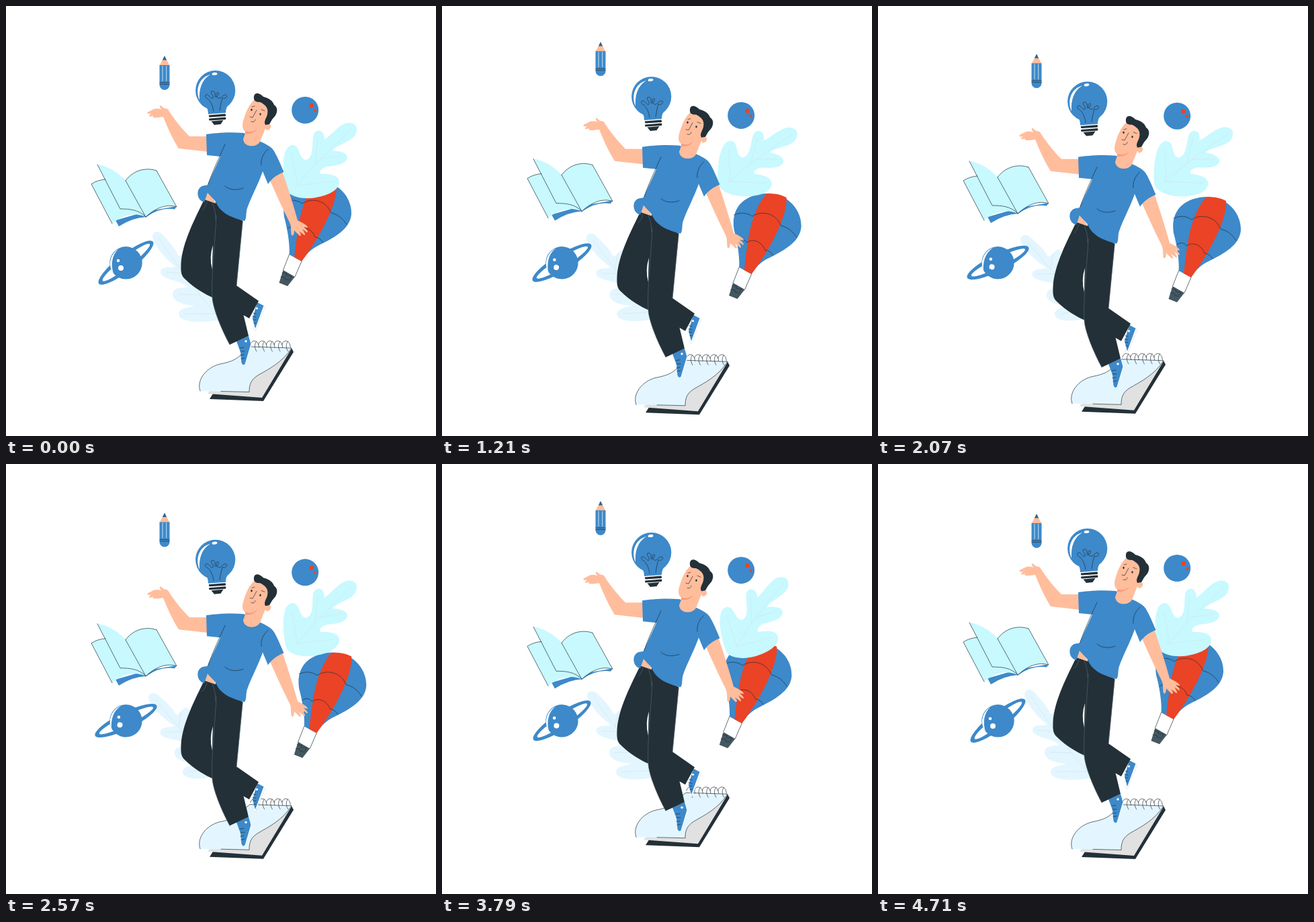
An HTML page that plays this animation: 640x640 px, repeating every 4780 ms.

```html
<!DOCTYPE html>
<html lang="en">
<head>
<meta charset="utf-8">
<title>Juggling ideas</title>
<style>
  html, body { margin: 0; height: 100%; overflow: hidden; background: #fff; }
  svg { display: block; width: 100vw; height: 100vh; }
  .blue { fill: #3d89ca; }
  .dark { fill: #233038; }
  .skin { fill: #ffbd9c; }
  .cyan { fill: #c7f9ff; }
  .pale { fill: #e3f6ff; }
  .red { fill: #ea4326; }
  .white { fill: #fff; }
  .line, .vein, .seam { fill: none; stroke: #233038; stroke-width: .7; stroke-linecap: round; stroke-linejoin: round; }
  .vein { stroke: #d3e6ec; }
  .seam { stroke: #52626b; }
</style>
</head>
<body>
<svg viewBox="0 0 640 640">
  <g id="lowerLeaf">
    <path class="pale" d="M219 347C215 337 226 332 233 340C242 350 250 358 254 367C258 378 262 367 272 362C290 380 298 415 310 430C318 445 322 458 320 467C300 471 258 474 257 458C257 449 275 449 280 446C266 446 247 440 248 428C249 418 264 420 270 418C262 408 229 408 230 395C231 387 244 390 252 388C236 375 224 360 219 347Z"/>
    <path class="vein" d="M228 346C250 380 285 430 318 465M238 396L263 398M256 429L288 430M266 458L311 458M258 390L264 368"/>
  </g>

  <g id="balloon">
    <g transform="translate(-26 -24)">
      <path class="blue" d="M490 284C522 285 541 310 540 334C538 358 510 371 488 382C478 388 470 396 466 404L447.500 394C449 378 444 352 440 338C435 306 454 285 490 284Z"/>
      <path class="red" d="M488 284.500Q505 283 518 290C520 318 492 370 466 404L455 398C460 362 462 316 488 284.500Z"/>
      <path class="line" d="M440 316C450 311 460 313 467 318C480 309 502 312 510 332C520 334 528 341 533 349M445 355C450 351 456 352 459 357C468 350 482 356 486 368Q494 369 498 376M447.500 394L438.500 417M466 404L456 427"/>
      <path fill="#445862" d="M438.500 417L456 427L445 441L432.500 436Z"/>
      <path class="line" d="M437 421l7 1l-1 3l8 1l-2 4M435 427l6 1l1 3l6 1"/>
    </g>
  </g>

  <g id="upperLeaf">
    <path class="cyan" d="M522 184C523 174 511 171 502 176C490 183 482 194 474 199C474 190 470 184 463 186C454 189 458 205 455 218C453 228 446 232 441 226C435 218 436 207 426 207C414 208 412 230 413 245C414 262 416 274 420 278C432 287 450 288 466 284C480 281 496 274 496 262C496 252 484 250 470 250C464 250 468 241 478 239C490 238 506 236 508 226C508 217 494 216 486 215C492 205 522 202 522 184Z"/>
    <path class="vein" d="M432 269C450 245 480 215 515 183M434 267L425 220M460 236L464 197M467 228L500 223M434 267L488 261"/>
  </g>

  <g id="pencil">
    <path class="skin" d="M233 80h6l4.500 8.500h-15Z"/>
    <path class="blue" d="M228.500 88h15v29.500a7.500 7.500 0 0 1-15 0Z"/>
    <path fill="#2d6693" d="M236 74l3.200 6.500h-6.400Z"/>
    <path d="M233 89v23M238.700 89v23" stroke="#c7dff2" fill="none"/>
    <path class="line" d="M229 114h14M229 116.500h14"/>
  </g>

  <g id="bulb">
    <circle class="blue" cx="311.700" cy="125.700" r="29.600"/>
    <path class="blue" d="M295 146Q301 151 301 161L327 159Q327 151 332 146Z"/>
    <path class="dark" d="M302 162.500L326 160.500Q328 162 326.500 164L303 165.500Q301 164 302 162.500ZM302.500 167.500L326.500 165.500Q328.500 167 326.500 169L303 170.500Q301 169 302.500 167.500ZM305.500 171.500L323.500 170L319.500 176L310 177Z"/>
    <path class="white" d="M304 102C288 106 281 124 288 140C287 124 291 110 304 102Z"/>
    <ellipse class="white" cx="310.500" cy="101" rx="4" ry="2" transform="rotate(-8 310.500 101)"/>
    <path class="line" d="M309 157C308 148 304 141 300 138C295 136 296 131 300 132C304 135 306 139 308 137C310 133 303 130 306 127C311 125 312 132 311 135C313 137 318 132 316 129C312 128 312 135 316 137C320 139 322 132 327 132C331 134 327 139 322 137Q319 147 318 156"/>
  </g>

  <g id="moon">
    <circle class="blue" cx="445.200" cy="155" r="20"/>
    <circle class="red" cx="454.600" cy="148" r="3.200"/>
    <circle class="red" cx="460" cy="155.500" r="2"/>
  </g>

  <g id="planet">
    <g transform="rotate(-37.900 178.500 382)">
      <ellipse class="blue" cx="178.500" cy="382" rx="51" ry="12.500"/>
      <ellipse class="white" cx="179" cy="382" rx="44.500" ry="7"/>
    </g>
    <circle class="blue" cx="178.500" cy="382.300" r="24.200"/>
    <path class="white" d="M167 362C155 369 151 386 160 398C156 386 157 371 167 362Z"/>
    <circle class="white" cx="171" cy="390" r="4"/>
    <circle class="white" cx="167" cy="379" r="2.300"/>
  </g>

  <g id="book">
    <path class="blue" d="M163 319L168 328Q188 315 209 314Q230 299 251 302.500L254 298L208 306Z"/>
    <path class="cyan" d="M127 265Q136 259 148 258L208 314C190 306 172 312 158 324Z"/>
    <path class="cyan" d="M178 260C188 246 206 239 224 245L254 299C238 294 222 301 208 314Z"/>
    <path class="cyan" d="M136 236C152 238 170 250 178 260L208 314C198 303 184 302 170 302Z"/>
    <path class="line" d="M208 314C222 301 238 294 254 299L224 245M148 258Q136 259 127 265L158 324M136 236L170 302C184 302 198 303 208 314M178 260L208 314M178 260C188 246 206 239 224 245"/>
  </g>

  <g id="notebook">
    <path class="dark" d="M308 577L303 585L383 588L428 515L425 509Z"/>
    <path fill="#e1e1e1" d="M303 573L300 577L381 583L425 510L364 545Z"/>
    <path class="pale" d="M289 573C283 557 298 538 318 533C338 529 344 526 358 511L363 507L425 509C412 530 390 541 376 549C364 556 362 564 362 574.500Z"/>
    <path class="line" d="M289 573C283 557 298 538 318 533C338 529 344 526 358 511L363 507L425 509C412 530 390 541 376 549C364 556 362 564 362 574.500L320 573.500"/>
    <g id="rings" class="line"></g>
  </g>

  <g id="man">
    <path class="white" d="M383 446L386 448L371 484L368 480Z" stroke="#d5dde1" stroke-width=".6"/>
    <path class="blue" d="M374 441L383.500 446L371 480L367 465Z"/>
    <circle class="white" cx="373.500" cy="450" r="1.600"/>
    <path class="line" d="M368 457l4 1M367 462l5 1M368 467l4 0M369 472l3 0"/>
    <path class="white" d="M362 497L366 504L355 534L352 533Z"/>
    <path class="blue" d="M343 499L361 491L364.500 503L355.500 533Q352.500 536 350.500 531L349 515Z"/>
    <circle class="white" cx="357" cy="499" r="1.700"/>
    <path class="line" d="M348 509l6-1M349 514l6 0M349 520l5-1M350 525l5-1"/>

    <path class="skin" d="M301 277L313 294L293 290Z"/>
    <path class="dark" d="M295 288C283 313 262 352 260.500 384C260 397 261 401 266 406C280 420 298 430 308 434L362 465L376 439L343 416L330 300Z"/>
    <path class="white" d="M308 356Q302 374 307 392Q307 374 308 356Z"/>
    <path class="dark" d="M312 291C325 306 340 313 352.500 320L343 417C350 445 356 470 361 491L333 504C320 480 308 450 307 434C306 410 310 360 312 318Z"/>
    <path class="seam" d="M313 312C311 355 305 405 307 434C308 450 320 480 333 504M352 322L343 417M299 291Q297 300 292 304M307 293Q312 303 312 318"/>

    <path class="skin" d="M301 194L273 194C262 183 250 168 243 157C241 152 238 153 235 152L230 148C227 149 230 153 232 154C228 153 222 152 219 154L211 158C209 161 213 161 216 160L213 163C213 166 217 164 219 163Q217 166 221 166C225 167 230 165 234 165C240 180 248 198 257 212L301 217Z"/>
    <path class="skin" d="M393 260C402 280 411 300 420 318Q424 325 424 330L424.500 340C427 344 429 340 429 334L437 342C441 342 438 338 436 335L444 341C447 341 443 335 441 332L448 337C451 336 446 331 443 329L449 330C450 327 440 322 434 319C429 300 421 275 411 245Z"/>
    <path class="blue" d="M298 191C310 189 332 187 354 189L377 201C386 205 395 209 399 216C405 226 409 237 413.500 247C404 251 396 256 390 265L382 246C377 262 361 292 358 305C357 312 358 316 355 320C340 316 319 310 312 291L300 278L295 292C284 289 283 275 289 270C293 266 298 268 300 266C307 250 314 236 319 224L299 222Z"/>
    <path class="line" d="M326 206C317 226 307 247 301 265M390 213C382 220 379 229 380 237M326 268C334 275 345 274 353 271"/>

    <path class="skin" d="M369 140L391 148L390 176C396 175 396 184 388 185L386 182L378 202C373 211 354 211 353 198L357 187C351 184 351 176 354 168C357 157 362 147 369 140Z"/>
    <path fill="#f79a78" d="M356 186C363 189 369 187 374 183Q369 191 356 190Z"/>
    <path class="dark" d="M369 138C368 129 375 127 383 135C389 137 396 139 399 147C405 151 404 158 401 163L396 169L392 176L386 177C383 171 388 167 389 161C391 153 387 147 378 143Q369 143 369 138Z"/>
    <path class="line" d="M373 155L367 166L363 165M365 172C368 174 371 171 371 169M366 150l4-1M380 154l5 2"/>
    <ellipse class="dark" cx="365.500" cy="154.500" rx="1.200" ry="1.700"/>
    <ellipse class="dark" cx="378.500" cy="161" rx="1.200" ry="1.700"/>
  </g>
</svg>
<script>
const LOOP = 4780, STEPS = 67;
const el = id => document.getElementById(id);
const hump = u => (1 - Math.cos(2 * Math.PI * u)) / 2;

// Sine-eased path through [step, value] keys, at rest at both ends of the loop.
function track(step, ...keys) {
  let [from, a] = [0, 0];
  for (const [to, b] of [...keys, [STEPS, 0]]) {
    if (step <= to) return a + (b - a) * hump((step - from) / (to - from) / 2);
    [from, a] = [to, b];
  }
}

const move = (id, x, y) => el(id).setAttribute('transform', `translate(${x} ${y})`);
const turn = (id, angle, x, y) => el(id).setAttribute('transform', `rotate(${angle} ${x} ${y})`);

let rings = '';
for (let x = 364; x < 420; x += 11.7)
  rings += `<path d="M${x} 504C${x + 1} 496 ${x + 12} 496 ${x + 12.500} 508M${x + 9} 499C${x + 5} 503 ${x + 6} 510 ${x + 9} 514"/>`;
el('rings').innerHTML = rings;

function draw(now) {
  const step = Math.floor((now % LOOP + 4) / LOOP * STEPS) % STEPS + .5;
  const u = step / STEPS, swell = hump(u);
  const sway = track(step, [24, 24.5], [48, -22]);
  const drift = track(step, [25.5, 26.6]);

  move('man', 0, 35 * swell);
  move('bulb', 0, 17 * swell);
  move('pencil', 0, -20.8 * hump(2 * u));
  move('moon', 0, track(step, [24, 9.5], [44.5, 4.8]));
  move('book', 0, track(step, [21, -9], [47.5, 8]));
  move('notebook', 0, sway);
  move('balloon', drift, drift * .925);
  turn('upperLeaf', sway * .44, 468, 230);
  turn('lowerLeaf', -6.2 * swell, 268, 403);
  turn('planet', 12 * swell, 178.5, 382);
  requestAnimationFrame(draw);
}
draw(performance.now());
</script>
</body>
</html>
```
